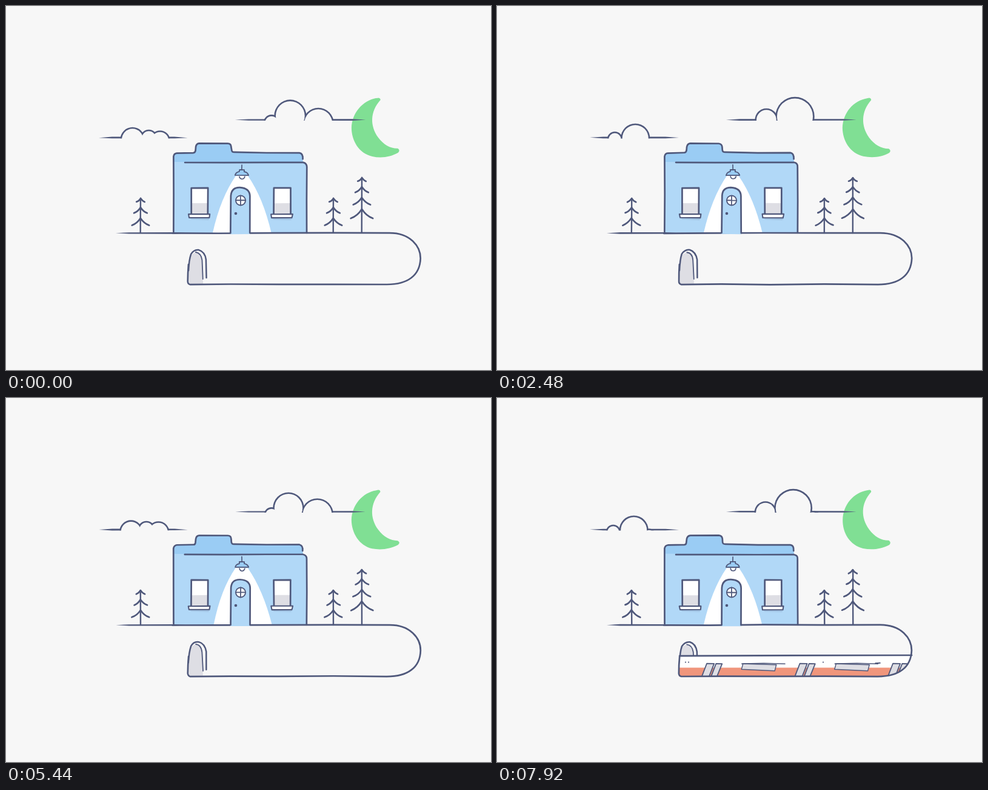
These frames come from a looping animation (800 by 600 pixels, 8000 ms). An HTML page with a canvas:

```html
<!DOCTYPE html>
<html lang="en">
<head>
<meta charset="utf-8">
<title>Night house</title>
<style>
html, body { margin: 0; width: 100%; height: 100%; overflow: hidden; background: #f7f7f7; }
canvas { display: block; }
</style>
</head>
<body>
<canvas id="stage" width="800" height="600"></canvas>
<script>
const g = document.getElementById('stage').getContext('2d');
const INK = '#4f587b', PAPER = '#f7f7f7', BLUE = '#b1d8f7', ROOF = '#9accf4',
  GREY = '#dedee4', GREEN = '#80df94', ORANGE = '#f0967c';
const LOOP = 8000, STEP = 80, CYCLE = 5760, GROUND = 374;
let tick = 0;

const mix = (a, b, f) => a + (b - a) * f;
const clamp = v => Math.max(0, Math.min(1, v));
const ease = v => { v = clamp(v); return v * v * (3 - 2 * v); };
const pulse = (t, at) => Math.exp(-(((t - at) / 350) ** 2));

// Hand-drawn wobble: every number of a path is nudged a little on each step
function wobbly(d, amount = 0.3) {
  let i = 0;
  return new Path2D(d.replace(/[\d.]+/g, n => {
    const s = Math.sin(++i * 12.9898 + tick * 78.233 + d.length) * 43758.5453;
    return (+n + (s - Math.floor(s) - 0.5) * 2 * amount).toFixed(2);
  }));
}

function shape(d, fill, width = 2.7) {
  const p = wobbly(d);
  if (fill) { g.fillStyle = fill; g.fill(p); }
  if (width) { g.lineWidth = width; g.stroke(p); }
}

function disc(x, y, r, color) {
  g.fillStyle = color;
  g.beginPath();
  g.arc(x, y, r, 0, 7);
  g.fill();
}

function taper(x0, x1, y, h = 1.25) {
  const a = x0 + 22, b = x1 - 22;
  shape(`M${x0} ${y} L${a} ${y - h} L${b} ${y - h} L${x1} ${y} L${b} ${y + h} L${a} ${y + h} Z`, INK, 0);
}

// Puffs drift along the cloud line, swell and sink; age in ms gives [x, height, radius]
function bigPuff(age) {
  const peak = 5000, rise = (age + 5500) / 10500, fall = (age - peak) / 5500;
  const height = age < peak ? mix(3, 36.4, ease(rise)) : 36.4 * (1 - fall ** 1.4);
  const r = 32.2 - (age < 5600 ? 5600 - age : age - 5600) * (age < 5600 ? 0.0023 : 0.0029);
  return rise > 0 && fall < 1 && [mix(438, 520.5, ease((age + 3000) / 13400)), height, r];
}
function widePuff(age) {
  const u = age / 9900, s = Math.sin(Math.PI * u);
  return u > 0 && u < 1 && [mix(188.5, 266.5, u), 22 * s, 8.5 + 14.3 * s];
}
function lowPuff(age) {
  const u = (age + 2200) / 7000, s = Math.sin(Math.PI * u);
  return u > 0 && u < 1 && [mix(187, 251, ease(u)), 14.2 * s, 8.5 + 4.7 * s];
}

function cloud(t, x0, x1, y, kinds) {
  const puffs = kinds.flatMap(kind =>
    [-1, 0, 1, 2].map(n => kind(t - 3200 + n * CYCLE)).filter(Boolean));
  const layer = (grow, color, bottom) => {
    g.save();
    g.beginPath();
    g.rect(0, 0, 800, bottom);
    g.clip();
    for (const [x, h, r] of puffs) disc(x, y - h + r, r + grow, color);
    g.restore();
  };
  taper(x0, x1, y);
  layer(1.3, INK, y + 1.2);
  layer(-1.3, PAPER, y + 4);
}

function tree(x, top, tiers, lean) {
  const bend = y => x + lean * ((GROUND - y) / (GROUND - top)) ** 2;
  shape(`M${x} ${GROUND} Q${x} ${(top + GROUND) / 2} ${bend(top)} ${top}`, null, 2.4);
  for (let i = 0; i < tiers; i++) {
    const y = top + i * 14 + i * i * 1.1, w = 7 + 3.7 * i, drop = 6 + 3 * i;
    const c = bend(y), e = bend(y + drop), elbow = y + drop * 0.75;
    shape(`M${e - w} ${y + drop} Q${c - w * 0.4} ${elbow} ${c} ${y} Q${c + w * 0.4} ${elbow} ${e + w} ${y + drop}`);
  }
}

function moon() {
  shape('M611 152 Q617 150 617.5 155 C600 174 600 198 614 217 C623 229 634 235 646 235 Q651 238 647 242 C634 249 619 251 604 248 C582 243 570 222 570 201 C571 176 588 156 611 152 Z', GREEN, 0);
}

function sash(x) {
  const r = x + 27.5;
  shape(`M${x} 300 L${r} 300 L${r} 344 L${x} 344 Z`, '#fff', 0);
  shape(`M${x} 325 L${r} 325 L${r} 344 L${x} 344 Z`, GREY, 0);
  shape(`M${x} 344 L${x} 300 L${r} 300 L${r} 344`);
  shape(`M${x - 2} 350 L${r + 3} 350 L${r + 1} 353 L${x} 352 Z`, '#a3c6e6', 0);
  shape(`M${x - 4.5} 343 L${r + 3.5} 343 L${r + 2.5} 349 L${x - 3.5} 349 Z`, '#fff', 2.1);
}

function house(swing) {
  const roof = 'L276.5 248 Q277 243 282 242.5 L309 242 Q312 242 312.5 238 L313 232 Q314 227 319 226.5 L366 226.5 Q371 227 371.5 232 L372 237 Q372 241 377 241 L430 242 L484 242 Q490 243 489.5 252';
  shape('M277 374 L277 256 L490 258 Q496 259 496 265 L496 374 Z', BLUE, 0);
  shape(`M277 257 ${roof} L490 258 Z`, ROOF, 0);
  shape(`M379 280 Q354 316 ${341 + swing} 374 L${437.5 + swing} 374 Q424 316 399 280 Z`, '#fff', 0);
  shape(`M276.5 374 L276.5 310 ${roof}`);
  shape('M295 258 L360 258 L430 258 L490 258 Q496 259 496 265 L496 320 L496 374');
  sash(305.5);
  sash(441.8);

  shape('M389 262 L389 271', null, 1.7);
  shape('M378 279 Q379 274 385 273 L385 270 L393 270 L393 273 Q399 274 400 279 Z', ROOF, 1.8);
  shape('M385 281 Q386 285 389.5 285 Q393 285 394 281', '#fff', 1.7);
}

function door() {
  const d = 'L371 313 Q372 299 386 299 Q402 300 402.5 313 L402.5';
  shape(`M370 376 ${d} 376 Z`, BLUE, 0);
  shape(`M370.5 374 ${d} 374`);
  disc(387, 320.5, 9, INK);
  disc(387, 320.5, 7.1, '#fff');
  shape('M387 312.5 L387 328.5 M379 320.5 L395 320.5', null, 1.8);
  disc(379, 342, 2.3, INK);
}

function portal() {
  shape('M302 458 Q301 430 305 411 Q311 405 318 407 Q324 412 324 424 L325 458 Z', GREY, 0);
  shape('M301 436 Q302 418 305 409 Q310 401 318 402 Q328 405 330 418 L330.5 448', null, 2.5);
  shape('M313 406 Q322 407 323.5 419 L325 450', null, 1.8);
}

function car() {
  shape('M346 438 L358 438 L350 459 L338 459 Z M361 438 L371 438 L363 459 L353 459 Z', GREY, 0);
  shape('M338 459 L346 438 L358 438 L350 459 M353 459 L361 438 L371 438 L363 459', null, 1.8);
  shape('M406 438 L461 440 L458 450 L403 447 Z', GREY, 1.4);
  shape('M404 438 L440 437 L475 438', null, 1.6);
}

function train(t) {
  const speed = 1.2, front = 300 + (t - 7440) * speed;
  if (front <= 300) return;
  g.save();
  g.clip(new Path2D('M300 423 L684 423 C682 444 663 459 630 459 L300 459 Z'));
  g.clip(new Path2D(`M290 420 L${front} 420 L${front - 12} 460 L290 460 Z`));
  g.fillStyle = '#fff';
  g.fillRect(290, 424, 400, 36);
  g.fillStyle = ORANGE;
  g.fillRect(290, 444.5, 400, 16);
  g.translate((t - 7920) * speed, 0);
  for (const x of [311, 316, 538]) disc(x, 435.5, 1.1, INK);
  shape('M624 437 L632 437', null, 1.8);
  for (let k = 0; k < 5; k++) {
    car();
    g.translate(153.5, 0);
  }
  g.restore();
  const end = Math.min(front, 684);
  shape(`M301 425 L${(301 + end) / 2} 424.5 L${end} 424`);
  if (front < 684) shape(`M${front} 424 L${front - 12} 459`);
}

function ground() {
  taper(181, 300, 374.3);
  shape('M275 374.5 L350 374.5 L440 374 L540 374 L632 374 C667 374 684 396 684 416 C683 444 663 459 628 459 L540 458.5 L450 459 L370 458.5 L304 459 Q300 458 300 454 Q300 440 301 426');
}

function draw(now) {
  tick = Math.floor((now % LOOP) / STEP);
  const t = tick * STEP, gust = pulse(t, 3200);
  g.fillStyle = PAPER;
  g.fillRect(0, 0, 800, 600);
  g.strokeStyle = INK;
  g.lineCap = g.lineJoin = 'round';

  moon();
  cloud(t, 378, 593, 187.5, [bigPuff]);
  cloud(t, 153, 300, 217, [widePuff, lowPuff]);
  tree(222, 317, 3, 0);
  tree(540, 317, 3, -2.5 * gust);
  tree(587, 283, 4, -6.5 * gust);
  house(4 * gust + 1.5 * pulse(t, 5440));
  portal();
  train(t);
  ground();
  door();
}

const start = performance.now();
function frame() {
  draw(performance.now() - start);
  requestAnimationFrame(frame);
}
frame();
</script>
</body>
</html>
```
